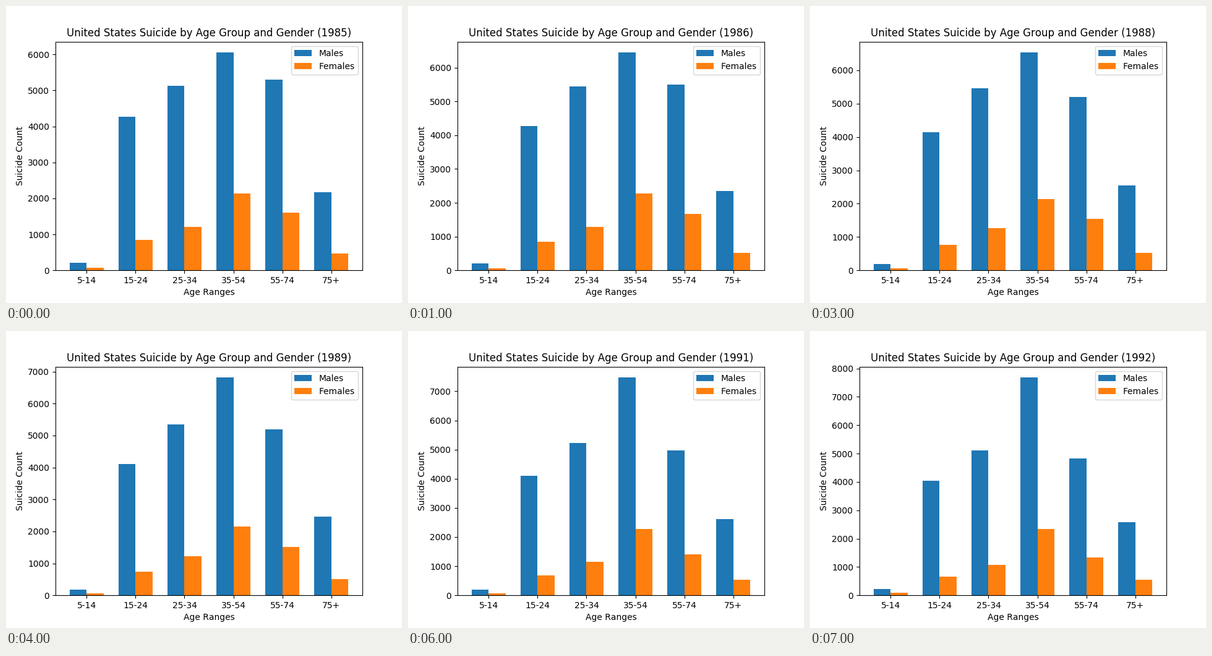
Write a matplotlib script that moves like this. It is 640 by 480 pixels and loops after 8000 ms.

```python
import numpy as np
import matplotlib.pyplot as plt
from matplotlib.animation import FuncAnimation

plt.rcParams["text.kerning_factor"] = 6  # whole-pixel kerning

YEARS = range(1985, 1993)
WIDTH = 0.35

# Male counts at key years; the years between are interpolated
MALE_YEARS = [1985, 1986, 1988, 1989, 1990, 1992]
MALES = {
    "5-14": [205, 205, 190, 178, 190, 220],
    "15-24": [4267, 4276, 4143, 4112, 4152, 4041],
    "25-34": [5134, 5450, 5461, 5353, 5350, 5110],
    "35-54": [6053, 6449, 6534, 6814, 7265, 7680],
    "55-74": [5302, 5504, 5201, 5198, 5123, 4826],
    "75+": [2177, 2351, 2547, 2465, 2646, 2579],
}

# Female counts as a drifting share of the male ones
SHARE_YEARS = [1986, 1990, 1992]
SHARES = {
    "5-14": [0.32, 0.342, 0.40],
    "15-24": [0.199, 0.172, 0.163],
    "25-34": [0.236, 0.228, 0.210],
    "35-54": [0.353, 0.302, 0.305],
    "55-74": [0.302, 0.289, 0.277],
    "75+": [0.217, 0.197, 0.213],
}

fig, ax = plt.subplots(figsize=(6.4, 4.8), dpi=100)
x = np.arange(len(MALES))


def at_year(year, key_years, groups):
    return np.array([np.interp(year, key_years, v) for v in groups.values()])


def draw(year):
    males = at_year(year, MALE_YEARS, MALES)
    females = males * at_year(year, SHARE_YEARS, SHARES)
    ax.clear()
    ax.bar(x - WIDTH / 2, males, WIDTH, label="Males")
    ax.bar(x + WIDTH / 2, females, WIDTH, label="Females")
    ax.set_xlabel("Age Ranges")
    ax.set_ylabel("Suicide Count")
    ax.set_title(f"United States Suicide by Age Group and Gender ({year})")
    ax.set_xticks(x, list(MALES))
    ax.legend(loc="upper right")


anim = FuncAnimation(fig, draw, frames=YEARS, init_func=lambda: draw(YEARS[0]),
                     interval=1000, repeat=True, repeat_delay=0)
plt.show()
```
